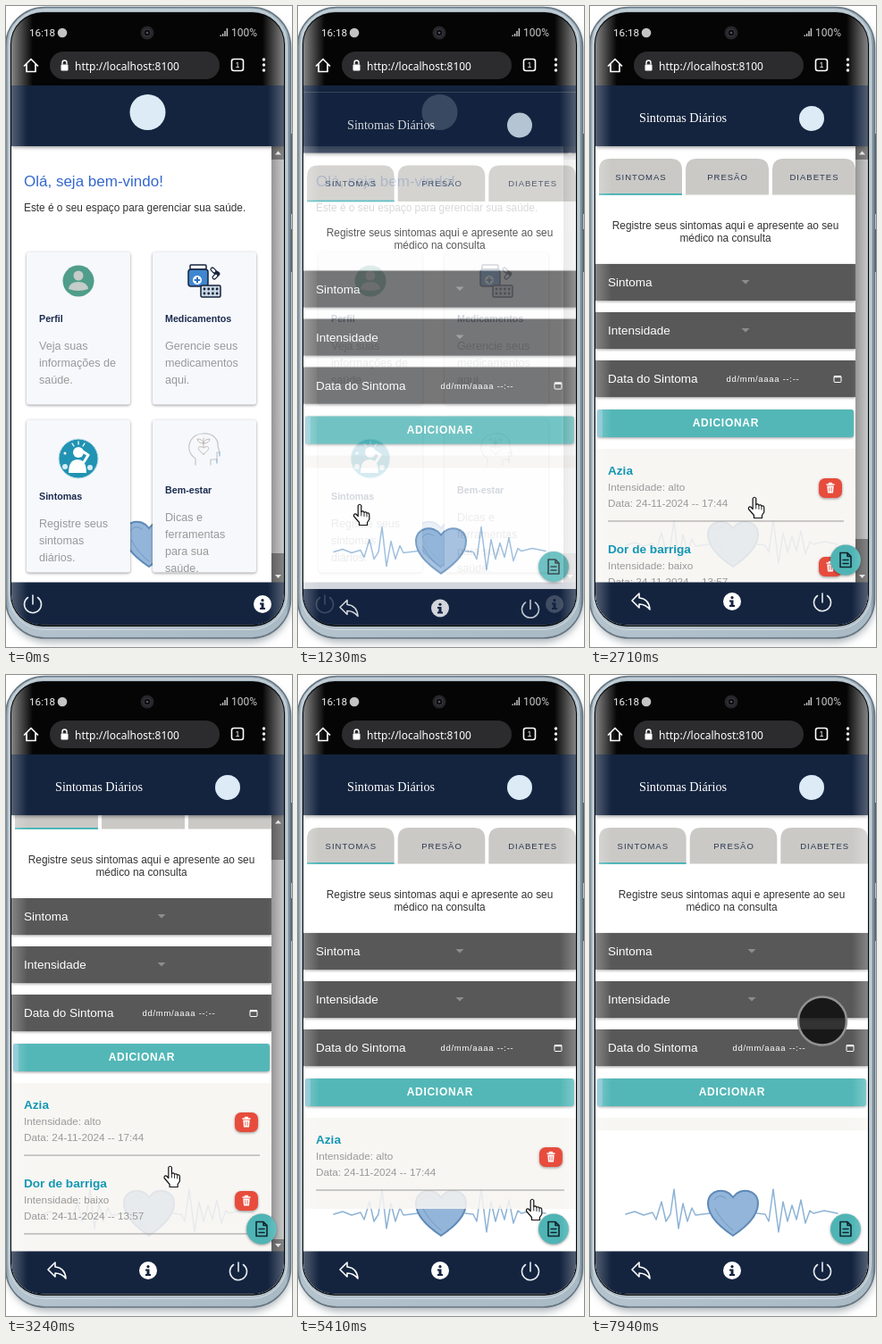
Recreate the animation shown at these times as an HTML page. Size 320 by 718 pixels, loop 8 s.

```html
<!DOCTYPE html>
<html lang="pt">
<head>
<meta charset="utf-8">
<title>Sintomas Diários</title>
<style>
  html, body { margin: 0; width: 100%; height: 100%; overflow: hidden; background: #fff; }
  svg { display: block; width: 100%; height: 100%; font-family: "Liberation Sans", Arial, sans-serif; }
  .card, .fab { filter: drop-shadow(0 1px 1.5px rgba(0, 0, 0, .4)); }
  .bar { filter: drop-shadow(0 1px 2px rgba(0, 0, 0, .5)); }
</style>
</head>
<body>
<svg id="stage" viewBox="0 0 320 718" xmlns="http://www.w3.org/2000/svg"></svg>
<script>
const NAVY = '#14243f', TEAL = '#53b7b7', RED = '#e74c3c';
const LOOP = 8000, WIDE = 305, NARROW = 291;

// --- drawing helpers -------------------------------------------------------
const text = (x, y, s, size, fill, extra = '') =>
  `<text x="${x}" y="${y}" font-size="${size}" fill="${fill}" ${extra}>${s}</text>`;
const rect = (x, y, w, h, fill, extra = '') =>
  `<rect x="${x}" y="${y}" width="${w}" height="${h}" fill="${fill}" ${extra}/>`;
const circle = (x, y, r, fill, extra = '') =>
  `<circle cx="${x}" cy="${y}" r="${r}" fill="${fill}" ${extra}/>`;
const line = (d, stroke, width = 1.5, extra = '') =>
  `<path d="${d}" fill="none" stroke="${stroke}" stroke-width="${width}" stroke-linecap="round" stroke-linejoin="round" ${extra}/>`;
const shape = (d, fill, extra = '') => `<path d="${d}" fill="${fill}" ${extra}/>`;
const at = (x, y, body, extra = '') => `<g transform="translate(${x} ${y})" ${extra}>${body}</g>`;
const MID = 'text-anchor="middle"', BOLD = 'font-weight="bold"';

const info = (x, y) => at(x, y, circle(0, 0, 10, '#fff') + circle(0, -4.3, 1.6, NAVY) +
  shape('M-3-1.5H1.5V4H3V6H-3V4H-1.5V.5H-3Z', NAVY));
const power = (x, y) => at(x, y, line('M-5.5-7.5A9.5 9.5 0 1 0 5.5-7.5M0-10V0', '#e8ecf0', 1.6));
const reply = (x, y) => at(x, y, line('M-10-1L-2-9V-4Q9-3 10 9Q5 3-2 3V7Z', '#fff', 1.6));

const HEART = 'M160 628C148 620 132 607 132 592C132 576 152 573 160 585C168 573 188 576 188 592C188 607 172 620 160 628Z';
const heartbeat = line('M40 604L50 601 60 605 70 602 74 610 80 590 85 612 90 604 94 576 99 620 104 592 109 612 114 597 118 605 134 603', '#8db3d6') +
  line('M187 603L196 604 200 612 205 576 211 624 216 590 221 612 226 594 231 610 236 588 241 614 246 600 250 603 262 600 277 603', '#8db3d6') +
  shape(HEART, '#93b5d9', 'stroke="#5d8ab8" stroke-width="2"') +
  line('M139 588Q144 580 152 586M140 598Q148 613 160 622', '#7199c4', 1);

const scrollbar = (top, bottom) => rect(297, 157, 14, 489, '#565656') +
  rect(297, top, 14, bottom - top, 'url(#thumb)') +
  shape('M301 166.500h7l-3.500-4Z', '#ddd') + shape('M301 637h7l-3.500 4Z', '#ddd');

const header = body => `<g class="bar">${rect(6, 89, 305, 68, NAVY)}</g>` + body;
const footer = body => rect(6, 645.5, 305, 48, NAVY) + body;

// --- home page -------------------------------------------------------------
function card(x, y, title, titleY, lines) {
  return `<g class="card">${rect(x, y, 116, 171, '#f6f8fc', 'rx="3"')}</g>` +
    text(x + 14, titleY, title, 10.7, '#1c2b4d', BOLD) +
    lines.map((s, i) => text(x + 14, titleY + 31 + 19 * i, s, 12.6, '#999')).join('');
}

const icons =
  circle(81, 308, 17.5, '#4f9d8a') + circle(81, 302, 5.5, '#c5ccca') +
  shape('M70 317Q71 309 81 309T92 317Q81 321 70 317Z', '#c5ccca') +
  rect(206, 290, 18, 5, '#fff', 'rx="1" stroke="#17233d" stroke-width="1.500"') +
  rect(204, 295, 22, 19, '#3f86cf', 'rx="3" stroke="#17233d" stroke-width="1.500"') +
  circle(214, 307, 5, '#fff') + line('M214 304.500v5M211.500 307h5', '#2c6fbb', 2) +
  line('M231 295l4 4M233 304l4-4', '#17233d', 5) + line('M231 295l2 2M233 304l2-2', '#fff', 2.5) +
  rect(218, 313, 22, 13, '#c9d6e2', 'rx="1.500" stroke="#17233d" stroke-width="1.500"') +
  [0, 1, 2, 3].map(i => circle(222 + 4.7 * i, 317, 1.4, '#17233d') + circle(222 + 4.7 * i, 322, 1.4, '#17233d')).join('') +
  circle(81, 507, 22, '#2193b3', 'stroke="#bfdde6"') + circle(81, 500, 6, '#fff') +
  shape('M70 523Q70 508 80 508T90 523Z', '#fff') + line('M87 511l5-8-6-4', '#fff', 3) +
  line('M74 490l2 3M81 488v3M88 490l-2 3', '#fff', 1.3) +
  circle(66, 516, 3, '#d6edf3') + circle(94, 517, 3, '#d6edf3') + circle(66, 501, 1.5, '#fff') +
  line('M212 514V507C200 500 203 480 220 479C233 478 238 487 237 493L239 500H236V508H229V514', '#c4c6c8', 1.2) +
  line('M221 502C212 496 215 491 221 495C227 491 230 496 221 502ZM221 494V484M221 490q-6 0-7-5 6 0 7 5q1-5 7-5-1 5-7 5', '#c1b9b0', 1) +
  line('M236 508v4M239 500v4', '#6fa6cf', 1);

const home = rect(6, 89, 305, 605, '#fff') + heartbeat +
  text(20, 202, 'Olá, seja bem-vindo!', 17, '#3467cd') +
  text(20, 230, 'Este é o seu espaço para gerenciar sua saúde.', 11.85, '#333') +
  card(23, 275.5, 'Perfil', 354, ['Veja suas', 'informações de', 'saúde.']) +
  card(164, 275.5, 'Medicamentos', 354, ['Gerencie seus', 'medicamentos', 'aqui.']) +
  card(23, 463.5, 'Sintomas', 553, ['Registre seus', 'sintomas', 'diários.']) +
  card(164, 463.5, 'Bem-estar', 546, ['Dicas e', 'ferramentas', 'para sua', 'saúde.']) +
  icons + scrollbar(172, 613) +
  header(circle(158.5, 119, 20, '#dcebf6')) +
  footer(power(30, 670) + info(287, 670));

// --- symptoms page ---------------------------------------------------------
const trashIcon = line('M-4-4H4M-1.500-5.500H1.500', '#fff', 1.5) +
  shape('M-3.700-2.500H3.700L3 5.500H-3Z', '#fff') + line('M-1.200-.500V3.500M1.200-.500V3.500', RED, .8);

function entry(width, row, [name, level, when, id]) {
  return at(0, row * 88,
    text(20, 525, name, 13.6, '#1296b4', BOLD) +
    text(20, 543, 'Intensidade: ' + level, 11.75, '#999') +
    text(20, 561, 'Data: ' + when, 11.75, '#999') +
    rect(20, 576.5, width - 27, 1, '#999') +
    `<g class="card">${rect(width - 35, 529, 26, 22, RED, `rx="7" id="${id}"`)}</g>` +
    at(width - 22, 540, trashIcon));
}

function form(width, entries) {
  const mid = 6 + width / 2, col = width / 3;
  const tabs = ['SINTOMAS', 'PRESÃO', 'DIABETES'].map((s, i) => {
    const x = 10 + i * col, w = col - 4;
    return shape(`M${x} 211.500V184Q${x} 171 ${x + 13} 171H${x + w - 13}Q${x + w} 171 ${x + w} 184V211.500Z`, '#cac9c6') +
      text(x + w / 2 + .5, 194.5, s, 9.5, '#2c3850', MID + ' letter-spacing="1"');
  }).join('');
  const field = (y, label) => `<g class="card">${rect(6, y, width, 41, '#585859')}</g>` +
    text(20, y + 25, label, 13.5, '#fff');
  const caret = y => shape(`M${mid + 18} ${y}h9l-4.500 4.500Z`, '#8d8d8d');
  const cal = 6 + width - 24;
  return tabs + rect(10, 210, col - 4, 1.8, '#3fb1b5') +
    text(mid, 250, 'Registre seus sintomas aqui e apresente ao seu', 11.85, '#333', MID) +
    text(mid, 264, 'médico na consulta', 11.85, '#333', MID) +
    field(289, 'Sintoma') + caret(307) + field(343, 'Intensidade') + caret(361) +
    field(397, 'Data do Sintoma') +
    text(mid + 1, 421, 'dd/mm/aaaa --:--', 9.5, '#fff', 'letter-spacing=".7"') +
    rect(cal, 414.5, 8, 7, 'none', 'stroke="#fff" rx="1"') + rect(cal, 414, 8, 2.2, '#fff') +
    `<g class="card">${rect(8, 452, width - 4, 31, TEAL, 'rx="3"')}</g>` + rect(8, 452, 6, 31, '#8cc4dc', 'rx="2" opacity=".7"') +
    text(mid + .4, 471, 'ADICIONAR', 12, '#fff', `${MID} ${BOLD} letter-spacing=".7"`) +
    rect(6, 496, width, 14 + 88 * entries.length, '#f7f5f1', 'opacity=".85"') +
    entries.map((e, i) => entry(width, i, e)).join('');
}

const azia = id => ['Azia', 'alto', '24-11-2024 -- 17:44', id];
const barriga = ['Dor de barriga', 'baixo', '24-11-2024 -- 13:57', 'trashB'];

const symptoms = rect(6, 89, 305, 605, '#fff') + heartbeat +
  `<g id="empty">${form(WIDE, [])}</g>` +
  `<g id="two">${form(NARROW, [azia('trashA'), barriga])}</g>` +
  `<g id="one">${form(WIDE, [azia('trashC')])}</g>` +
  `<g id="barTop">${scrollbar(172, 597)}</g><g id="barEnd">${scrollbar(207, 632)}</g>` +
  `<g class="fab">${circle(286, 620.5, 17, '#4fb4b5')}</g>` +
  at(286, 620.5, line('M-6-8H2L6-4V8H-6ZM2-8V-4H6M-3 0H3M-3 4H3', '#10242c', 1.6)) +
  header(text(55, 130, 'Sintomas Diários', 14.2, '#fff', 'font-family="Liberation Serif, Times, serif"') +
    circle(248, 126, 14, '#dcebf6')) +
  footer(reply(57, 667) + info(159, 667) + power(260, 668));

// --- phone -----------------------------------------------------------------
const phone = rect(1, 6, 318, 707, '#8d979e', 'rx="46" filter="url(#soft)" opacity=".7"') +
  rect(319, 143, 3, 90, '#4d5a66') + rect(319, 250, 3, 48, '#4d5a66') +
  rect(-.5, 1.5, 319, 706.5, 'url(#metal)', 'rx="44" stroke="#667682" stroke-width="1.500"') +
  rect(3, 4.5, 311.5, 694, '#aebdc7', 'rx="40" stroke="#d5dee4"') +
  rect(5, 7, 307, 688, '#000', 'rx="36"');

const status = rect(6, 8, 305, 81, '#050505') +
  rect(6, 8, 24, 81, 'url(#glowL)', 'opacity=".85"') + rect(287, 8, 24, 81, 'url(#glowR)', 'opacity=".85"') +
  text(26, 34, '16:18', 11.7, '#f2f2f2', 'font-family="Roboto, sans-serif"') +
  circle(63, 30, 5.3, '#c4c4c4') +
  circle(158, 30, 7.5, '#26262a') + circle(158, 30, 4, '#0b0b0f', 'stroke="#3c3c44"') + circle(158, 30, 1.3, '#55555f') +
  [1.5, 3, 6, 9].map((h, i) => rect(239.5 + 2.4 * i, 34 - h, 1.4, h, '#c9c9c9')).join('') +
  text(252, 34, '100%', 12, '#c9c9c9', 'font-family="Roboto, sans-serif"') +
  rect(49, 51, 190, 31, '#2c2c2e', 'rx="15.500"') +
  line('M20.500 67L28 59.500 35.500 67M23 65.500V73.500H33V65.500', '#fff', 1.7) +
  rect(61.5, 65.5, 8, 7, '#fff', 'rx="1"') + line('M63 65V63.500A2.500 2.500 0 0 1 68 63.500V65', '#fff', 1.4) +
  text(77, 72, 'http://localhost:8100', 12, '#fff', 'font-family="Noto Sans, sans-serif"') +
  rect(252.5, 59.5, 13, 13, 'none', 'rx="2.500" stroke="#fff" stroke-width="1.600"') +
  text(259, 69.3, '1', 9, '#fff', MID) +
  [60, 66, 72].map(y => circle(288.5, y, 1.7, '#fff')).join('');

const hand = shape('M-1.800 1.500Q0-1 1.800 1.500V8.500Q3.800 7 5 9.200Q7 8 8 10Q10.500 9.200 10.800 12V17L8.500 20.500V23.500H-.500V20.500L-6.500 13.500Q-7 10.500-4.200 11L-1.800 13.500Z',
  '#fff', 'stroke="#111" stroke-width="1.200" stroke-linejoin="round"') +
  line('M1.800 8.500V13M5 9.500V13.500M8 10.500V14', '#111', .9);

const glow = (id, a, b) => `<linearGradient id="${id}"><stop offset="0" stop-color="#fff" stop-opacity="${a}"/>` +
  `<stop offset="1" stop-color="#fff" stop-opacity="${b}"/></linearGradient>`;

document.getElementById('stage').innerHTML = `<defs>
  <filter id="soft"><feGaussianBlur stdDeviation="4"/></filter>
  <clipPath id="screen"><path d="M6 89H311V659Q311 693.500 276 693.500H41Q6 693.500 6 659Z"/></clipPath>
  <clipPath id="glass">${rect(6, 8, 305, 685.5, '#000', 'rx="35"')}</clipPath>
  <linearGradient id="metal"><stop offset="0" stop-color="#7d909d"/><stop offset=".015" stop-color="#b4c3cd"/>
    <stop offset=".985" stop-color="#a9bac5"/><stop offset="1" stop-color="#6f828f"/></linearGradient>
  <linearGradient id="thumb"><stop offset="0" stop-color="#8f8f8f"/><stop offset="1" stop-color="#b4b4b4"/></linearGradient>
  ${glow('glowL', .6, 0)}${glow('glowR', 0, .6)}
</defs>` + phone +
  `<g clip-path="url(#glass)">${status}
    <g clip-path="url(#screen)">${home}<g id="symptoms">${symptoms}</g>
      ${rect(6, 89, 18, 605, 'url(#glowL)', 'opacity=".45"')}${rect(293, 89, 18, 605, 'url(#glowR)', 'opacity=".45"')}
    </g></g>
  <g id="touch">${circle(260, 387.5, 27, '#0c0c0d', 'fill-opacity=".84" stroke="#929292" stroke-width="2.500"')}</g>
  <g id="hand">${hand}</g>`;

// --- motion ----------------------------------------------------------------
const $ = id => document.getElementById(id);

// Picture updates come in bursts: start, end, count.
const bursts = [[0, 0, 1], [260, 1040, 11], [1090, 1490, 7], [1690, 2040, 6], [2240, 2240, 1], [2640, 2710, 2],
  [3240, 3240, 1], [3790, 3790, 1], [4250, 5000, 11], [5070, 5070, 1], [5270, 5410, 3],
  [6200, 6960, 11], [7030, 7800, 12], [7870, 7940, 2]];
const ticks = bursts.flatMap(([a, b, n]) =>
  Array.from({ length: n }, (_, i) => n > 1 ? a + (b - a) * i / (n - 1) : a));

// Pointer tip: time, x, y.
const pointer = [[260, 152, 663], [700, 34, 600], [960, 67, 545], [1040, 69, 558], [1640, 69, 558],
  [1870, 125, 547], [2040, 183, 566], [2200, 183, 566], [2240, 184, 553], [2600, 184, 553], [2640, 184, 550],
  [4200, 183, 550], [4470, 259, 590], [4560, 259, 590], [4700, 263, 598], [5000, 262, 587], [6150, 262, 587],
  [6640, 172, 537], [6690, 172, 537], [6960, 65, 518], [7660, 283, 536], [8000, 283, 536]];

function along(path, t) {
  const i = Math.max(1, path.findIndex(p => p[0] >= t));
  const [a, b] = [path[i - 1], path[i]];
  const k = Math.min(1, Math.max(0, (t - a[0]) / (b[0] - a[0])));
  return [a[1] + (b[1] - a[1]) * k, a[2] + (b[2] - a[2]) * k];
}

const show = (id, on) => { $(id).style.display = on ? '' : 'none'; };
const hover = (id, on) => $(id).setAttribute('fill', on ? '#c94337' : RED);

function render(time) {
  const t = ticks.reduce((last, tick) => tick <= time + .01 ? tick : last, 0);
  const k = Math.min(1, Math.max(0, (t - 1135) / 280));
  const enter = 1 - (1 - k) ** 4.4;
  const scrolled = t >= 3240;
  const two = t >= 1490 && t < 5270, one = t >= 5270 && t < 7800;

  show('symptoms', k > 0);
  $('symptoms').setAttribute('opacity', enter);
  $('symptoms').setAttribute('transform', `translate(0 ${40 * (1 - enter)})`);
  show('two', two);
  show('one', one);
  show('empty', !two && !one);
  $('two').setAttribute('transform', `translate(0 ${scrolled ? -39 : 0})`);
  show('barTop', two && !scrolled);
  show('barEnd', two && scrolled);
  hover('trashB', t >= 4400);
  hover('trashC', t >= 7600);

  const [x, y] = along(pointer, t);
  show('hand', t >= 260 && t < 7870);
  $('hand').setAttribute('transform', `translate(${x} ${y})`);
  show('touch', t >= 7940);
}

const begin = performance.now();
function frame() {
  render((performance.now() - begin) % LOOP);
  requestAnimationFrame(frame);
}
frame();
</script>
</body>
</html>
```
